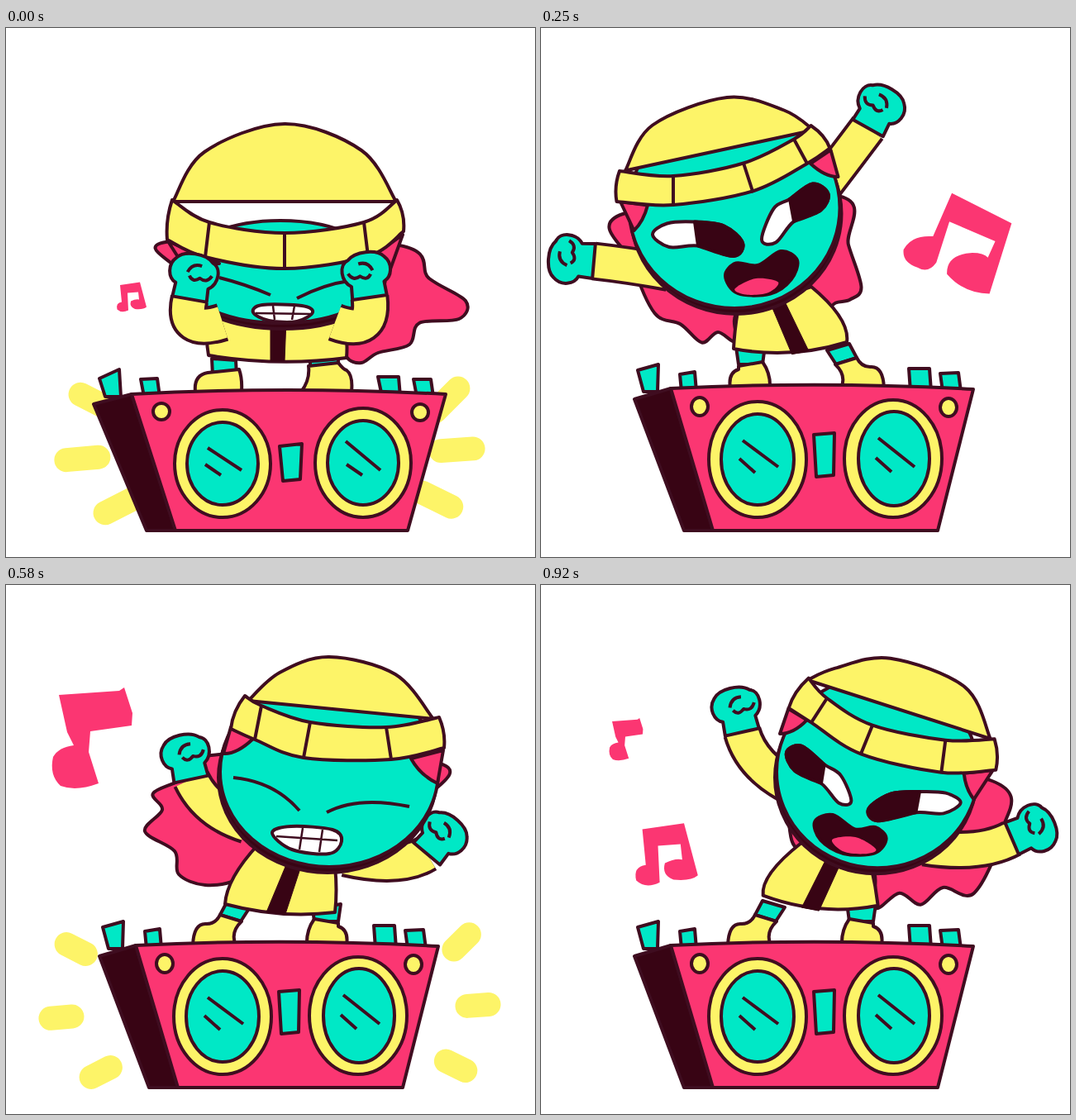
An HTML page that plays this animation: 640 by 640 pixels, repeating every 1000 ms.

```html
<!DOCTYPE html>
<html lang="en">
<head>
<meta charset="utf-8">
<title>Boombox dancer</title>
<style>
html, body { margin: 0; width: 100%; height: 100%; overflow: hidden; background: #fff; }
svg { display: block; width: 100%; height: 100%; }
</style>
</head>
<body>
<svg id="stage" viewBox="0 0 640 640"></svg>
<script>
const PINK = '#fb3672', TEAL = '#00e8c6', YELLOW = '#fdf468', DARK = '#380414', LINE = '#3f0d20', WHITE = '#fff';
const STEPS = 24, HALF = 12, LAST = 22, LOOP = 1000, AXIS = 641;
const stage = document.getElementById('stage');

// Keys are step numbers inside one lean to the left; the lean to the right mirrors them.
const body = {
  hair: {
    0: '470 262 512 303 556 330 548 352 500 357 488 383 450 393 430 405 412 398 405 370 350 340 280 330 230 320 205 290 200 258',
    2: '383 205 428 235 463 252 452 272 473 298 437 322 432 350 400 363 360 355 336 320 280 320 200 310 160 290 135 260 120 215',
    4: '366 205 398 255 429 312 410 335 388 345 374 362 335 335 240 342 237 366 220 362 204 373 180 355 160 320 130 270 104 215',
    8: '345 200 346 270 346 315 338 322 325 320 310 322 280 330 238 345 235 392 208 374 185 388 158 362 115 370 92 300 94 235',
    11: '340 200 340 270 335 300 330 315 320 318 305 322 280 330 240 345 237 390 207 372 180 386 153 368 118 374 80 300 96 238'
  },
  jacket: {
    0: 'M245 350Q241 375 245 396Q330 410 412 399Q414 375 408 350Z',
    2: 'M243 340Q240 370 243 396Q310 404 376 386Q374 355 336 314Z',
    4: 'M240 345Q236 370 236 389Q305 402 371 381Q374 352 328 314Z',
    8: 'M236 340Q232 365 230 387Q300 400 369 379Q374 352 326 312Z',
    11: 'M244 343Q238 365 235 388Q305 402 374 374Q376 350 326 312Z'
  },
  zip: {
    0: 'M320 352L339 352L337 403L320 403Z',
    2: 'M284 340L301 336L326 396L303 398Z',
    4: 'M279 336L295 332L323 391L303 395Z',
    11: 'M279 338L297 333L326 390L305 394Z'
  },
  legs: {
    0: 'M249 400L278 402L279 420L250 420ZM368 398L402 398L402 412L368 412Z',
    2: 'M236 390L270 396L268 411L239 411ZM346 394L373 386L382 403L357 411Z'
  },
  boots: {
    0: 'M244 417L282 413Q286 424 285 440L229 440Q227 420 244 417ZM366 409L402 405Q408 413 412 414Q420 420 418 440L357 440Q368 426 366 409Z',
    2: 'M239 413L268 408Q278 422 277 440L229 440Q226 421 239 417ZM356 411L382 403Q388 415 400 414Q414 414 415 440L363 440Q370 424 356 411Z'
  },
  face: { 0: '332 295 125 62', 2: '250 226 132 115', 4: '238 213 129 124', 8: '230 222 126 119', 11: '236 228 120 115' },
  tufts: {
    0: 'M196 258L258 285Q235 285 215 288ZM435 282Q455 286 462 300L480 250Z',
    2: 'M112 200L151 210Q140 230 119 240ZM342 186Q362 205 378 204L369 172Z',
    4: 'M100 205L132 210Q126 228 115 238ZM330 168Q350 185 367 184L358 150Z',
    8: 'M92 215L126 219Q122 240 110 252ZM322 160Q338 176 352 176L343 145Z',
    11: 'M95 228L131 232Q130 250 121 263ZM318 165Q334 182 352 182L341 152Z'
  },
  dome: {
    0: '202 210 240 150 337 116 430 148 472 210',
    2: '124 162 170 108 250 87 310 106 348 140',
    4: '108 167 145 115 235 84 303 101 340 132',
    8: '96 178 125 120 215 84 285 98 320 115',
    11: '98 190 130 125 220 91 285 102 318 115'
  },
  bandTop: {
    0: '201 208 246 235 337 248 433 235 473 208',
    2: '117 160 181 172 273 166 332 146 352 134',
    4: '99 167 167 177 252 164 313 138 335 124',
    8: '91 179 153 181 238 163 299 131 318 112',
    11: '93 190 151 191 241 173 293 140 317 113'
  },
  bandLow: {
    0: '195 256 241 277 337 291 438 276 481 246',
    2: '111 197 175 211 281 209 340 187 369 174',
    4: '95 205 164 210 262 196 328 167 357 148',
    8: '88 215 156 218 250 199 316 161 342 143',
    11: '92 228 157 231 256 207 313 169 341 152'
  },
  // wrist, bend, shoulder, fist angle
  armL: {
    0: '222 328 212 372 262 356 10', 2: '132 325 165 345 230 330 -40', 4: '66 288 110 290 160 296 -90',
    8: '62 276 100 283 150 295 -80', 11: '76 322 115 350 190 328 -60'
  },
  armR: {
    0: '440 326 446 374 398 356 -8', 2: '417 235 398 275 350 290 12', 4: '402 130 372 162 340 200 36',
    8: '389 112 368 148 335 195 22', 11: '402 211 395 255 340 268 8'
  },
  eyeL: {
    4: '138 250 155 236 189 235 225 241 246 262 234 276 193 263 158 263',
    8: '132 250 150 237 183 234 218 238 242 258 232 276 187 264 152 267',
    11: '134 270 152 259 183 258 218 260 246 277 235 290 188 281 155 281'
  },
  eyeR: {
    4: '271 262 288 222 307 209 335 195 355 207 345 227 312 238 290 262',
    8: '263 250 275 215 295 205 322 182 340 194 332 214 300 230 278 257',
    11: '267 267 280 238 300 223 328 201 346 207 335 230 303 245 282 267'
  },
  mouth: {
    4: '224 300 238 284 265 288 292 272 311 284 303 307 280 322 240 321',
    8: '222 300 234 285 260 286 288 268 309 278 302 302 275 321 236 321',
    11: '224 310 238 297 262 300 288 283 310 290 303 312 275 327 238 326'
  },
  tongue: {
    4: '236 316 262 303 288 307 276 320 250 323',
    8: '233 315 258 303 286 308 272 321 246 322',
    11: '237 322 262 306 290 308 277 323 252 327'
  },
  lids: {
    0: 'M258 302Q290 310 320 323M415 306Q385 310 352 327',
    2: 'M153 268Q215 255 253 275M366 233Q316 238 286 273'
  },
  grin: {
    0: '299 344 310 335 358 336 371 344 352 355 318 354',
    2: '235 310 246 296 296 292 319 300 295 320 250 325'
  },
  teeth: {
    0: 'M323 336L325 353M349 336L346 353M302 345L368 346',
    2: 'M258 296L262 323M282 294L286 320M240 309L314 304'
  }
};

// Boombox parts: colour, wide pose, tall pose
const boxPaths = [
  [TEAL, 'M113 424L137 413L139 446L120 446ZM163 425L183 424L186 446L167 446ZM450 422L475 422L477 446L455 446ZM493 425L514 425L517 446L497 446Z',
    'M117 414L142 407L141 440L124 440ZM168 419L186 416L188 440L170 440ZM445 412L470 412L472 440L447 440ZM483 418L505 417L508 440L486 440Z'],
  [DARK, 'M106 455L152 443L205 608L170 608Z', 'M113 449L157 436L208 608L173 608Z'],
  [PINK, 'M152 443Q340 433 532 443L486 608L205 608Z', 'M157 436Q340 427 523 437L480 608L208 608Z'],
  [TEAL, 'M331 506L358 503L356 546L335 548Z', 'M330 492L355 490L354 541L333 543Z']
];
const boxOvals = [
  [YELLOW, '188 464 10 10', '192 458 10 11'], [YELLOW, '501 465 10 10', '493 459 10 11'],
  [YELLOW, '262 527 58 65', '262 522 59 70'], [YELLOW, '432 526 58 66', '426 521 59 71'],
  [TEAL, '262 527 43 50', '262 522 44 55'], [TEAL, '432 526 43 51', '427 521 43 57']
];
const glints = ['M244 508L285 535M241 528L260 541M411 500L453 535M412 528L431 541',
  'M244 499L287 531M240 521L259 538M408 496L452 531M405 520L424 537'];

// Notes: path, centre, size over the whole loop
const notes = [
  { d: 'M497 199L570 236L543 322Q512 322 491 298Q490 274 522 272Q536 272 541 278L550 258L494 234L478 284Q468 298 455 290Q436 284 438 268Q448 250 474 252Z',
    x: 504, y: 262, size: { 1: '0', 2: '.4', 3: '.9', 4: '1', 8: '.98', 11: '1.08', 12: '.6', 13: '.2', 14: '0' } },
  { d: 'M64 133L137 128L143 124L153 155L152 170L102 177L100 202L112 240Q85 250 66 243Q52 230 57 208Q64 196 82 194L74 178Z',
    x: 102, y: 188, size: { 12: '0', 13: '.6', 14: '1', 16: '.97', 20: '1', 22: '.42' } },
  { d: 'M124 297L172 290L188 350Q180 357 160 355Q146 350 150 336Q162 330 170 332L168 314L142 316L144 358Q128 366 117 356Q113 340 128 338Z',
    x: 152, y: 325, size: { 0: '.5', 1: '.2', 2: '0', 14: '0', 15: '.6', 16: '1', 22: '1.05' } }
];

// Rays: outermost point and direction towards the box
const rays = [[66, 431, 27], [46, 525, -5], [96, 599, -27], [566, 417, 135], [592, 507, 176], [563, 591, 206]];
const rayFar = { 0: '27', 2: '8', 4: '0' }, rayNear = { 0: '66', 2: '34', 4: '0' };

const nums = s => s.match(/-?\d*\.?\d+/g).map(Number);

function at(keys, n) {
  const steps = Object.keys(keys).map(Number);
  const next = steps.find(k => k >= n);
  if (next === undefined) return keys[steps[steps.length - 1]];
  const prev = steps[steps.indexOf(next) - 1];
  if (next === n || prev === undefined) return keys[next];
  const u = (n - prev) / (next - prev), to = nums(keys[next]);
  let i = 0;
  return keys[prev].replace(/-?\d*\.?\d+/g, v => (+v + (to[i++] - v) * u).toFixed(2));
}

function points(s) {
  const v = nums(s), out = [];
  for (let i = 0; i < v.length; i += 2) out.push([v[i], v[i + 1]]);
  return out;
}

// Smooth curve through points; start is the command that reaches the first one
function curve(p, closed, start = 'M') {
  const len = p.length, last = closed ? len : len - 1;
  const get = i => closed ? p[(i + len) % len] : p[Math.max(0, Math.min(len - 1, i))];
  let d = start + p[0];
  for (let i = 0; i < last; i++) {
    const [a, b, c, e] = [get(i - 1), get(i), get(i + 1), get(i + 2)];
    d += `C${b[0] + (c[0] - a[0]) / 6},${b[1] + (c[1] - a[1]) / 6} ${c[0] - (e[0] - b[0]) / 6},${c[1] - (e[1] - b[1]) / 6} ${c}`;
  }
  return d + (closed ? 'Z' : '');
}

const path = (d, fill, stroke = LINE, width = 4) =>
  `<path d="${d}" fill="${fill}" stroke="${stroke}" stroke-width="${width}"/>`;
const blob = (s, fill, stroke) => path(curve(points(s), true), fill, stroke);

function oval(s, fill, dx = 0, dy = 0) {
  const [x, y, rx, ry] = nums(s);
  return `<ellipse cx="${x + dx}" cy="${y + dy}" rx="${rx}" ry="${ry}" fill="${fill}" stroke="${LINE}" stroke-width="4"/>`;
}

function arm(s, side) {
  const [x, y, bx, by, sx, sy, angle] = nums(s);
  const d = `M${x} ${y}Q${bx} ${by} ${sx} ${sy}`;
  return path(d, 'none', LINE, 47) + path(d, 'none', YELLOW, 39) +
    `<g transform="translate(${x} ${y})rotate(${angle})scale(${side} 1)">` +
    path('M-21 0L-20 -16C-32 -24 -32 -44 -20 -48C-10 -58 16 -57 24 -47C34 -37 30 -21 20 -17L21 0Z', TEAL) +
    path('M-22 -32Q-17 -22 -8 -27Q0 -20 5 -28M-8 -42Q4 -44 8 -32', 'none') + '</g>';
}

function eye(s) {
  const p = points(s);
  return path(curve(p, true), WHITE) + path(curve(p.slice(2, 7)) + 'Z', DARK, DARK);
}

function hat(n) {
  const top = points(at(body.bandTop, n)), low = points(at(body.bandLow, n));
  const [tl, ll] = [top[0], low[0]], [tr, lr] = [top[4], low[4]];
  const band = curve(top) + `Q${(tr[0] + lr[0]) / 2 + 6} ${(tr[1] + lr[1]) / 2 - 2} ${lr}` +
    curve(low.slice().reverse(), false, 'L') + `Q${(tl[0] + ll[0]) / 2 - 5} ${(tl[1] + ll[1]) / 2} ${tl}Z`;
  const seams = [1, 2, 3].map(i => `M${top[i]}L${low[i]}`).join('');
  return path(curve(points(at(body.dome, n))) + 'Z', YELLOW) + path(band, YELLOW) + path(seams, 'none');
}

function expression(n) {
  const get = part => at(body[part], n);
  if (n < 3) return path(get('lids'), 'none') + blob(get('grin'), WHITE) + path(get('teeth'), 'none', LINE, 2.5);
  return eye(get('eyeL')) + eye(get('eyeR')) + blob(get('mouth'), DARK, DARK) + blob(get('tongue'), PINK, 'none');
}

function dancer(n, lift) {
  const get = part => at(body[part], n);
  const arms = arm(get('armL'), -1) + arm(get('armR'), 1);
  return blob(get('hair'), PINK) + (n ? arms : '') +
    `<g transform="translate(0 ${lift})">` + path(get('legs'), TEAL) + path(get('boots'), YELLOW) + '</g>' +
    path(get('jacket'), YELLOW) + path(get('zip'), DARK, DARK, 1) +
    oval(get('face'), DARK, 2, 7) + oval(get('face'), TEAL) + expression(n) +
    path(get('tufts'), PINK) + hat(n) + (n ? '' : arms);
}

function boombox(tall) {
  const k = tall ? 2 : 1;
  return boxPaths.map(p => path(p[k], p[0])).join('') +
    boxOvals.map(o => oval(o[k], o[0])).join('') + path(glints[k - 1], 'none');
}

function sparks(n) {
  if (n > 5) return '';
  const far = +at(rayFar, n), near = +at(rayNear, n) + 0.1;
  return rays.map(([x, y, deg]) => {
    const c = Math.cos(deg * Math.PI / 180), s = Math.sin(deg * Math.PI / 180);
    return path(`M${x + c * far} ${y + s * far}L${x + c * near} ${y + s * near}`, 'none', YELLOW, n === 5 ? 14 : 29);
  }).join('');
}

const note = ({ d, x, y, size }, n) =>
  `<path fill="${PINK}" d="${d}" transform="translate(${x} ${y})scale(${at(size, n)})translate(${-x} ${-y})"/>`;

function draw(step) {
  const n = step % HALF, tall = step % 8 > 3;
  const flip = step < HALF ? '' : `transform="translate(${AXIS} 0)scale(-1 1)"`;
  stage.innerHTML = `<g stroke-linejoin="round"><g stroke-linecap="round">${sparks(n)}</g>` +
    notes.map(v => note(v, step)).join('') + `<g ${flip}>${dancer(n, tall ? -4 : 0)}</g>` + boombox(tall) + '</g>';
}

let shown = -1;
function tick(now) {
  // Steps begin on whole hundredths of a second
  const t = Math.floor(now % LOOP / 10) * 10 + 4.9;
  const step = Math.min(LAST, Math.floor(t * STEPS / LOOP));
  if (step !== shown) draw(shown = step);
  requestAnimationFrame(tick);
}
tick(performance.now());
</script>
</body>
</html>
```
